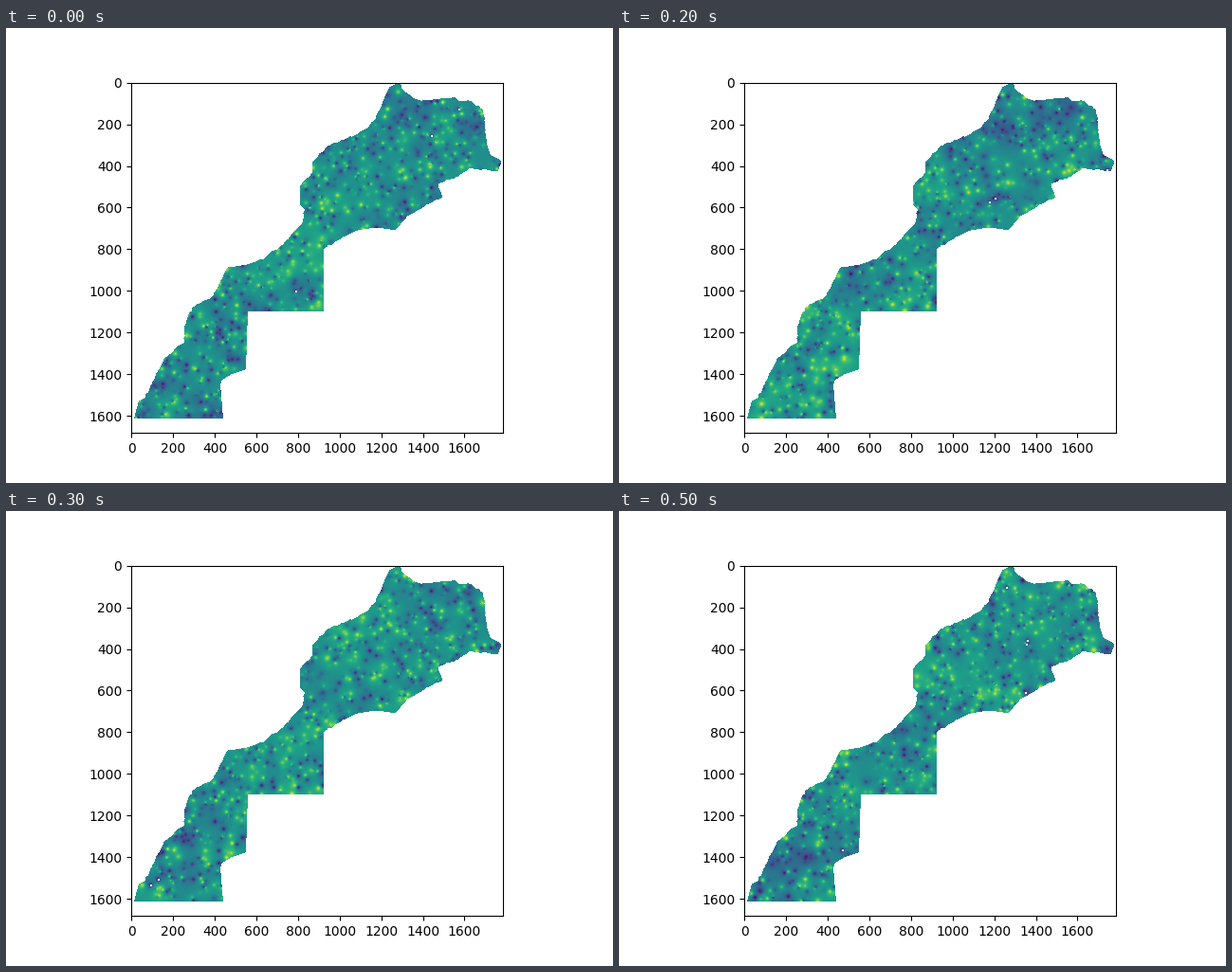
Write a matplotlib script that moves like this. It is 640 px wide and 480 px high and loops after 600 ms.

```python
import numpy as np
import matplotlib.pyplot as plt
from matplotlib.animation import FuncAnimation
from matplotlib.path import Path

WIDTH, HEIGHT = 1785, 1683          # data units of the map
COLS, ROWS = 392, 370               # one cell per screen pixel
LEFT, TOP = 132, 57                 # screen position of the first cell
FRAMES, SAMPLES = 6, 800

# Key points of the outline in screen pixels, clockwise.
NORTH_EAST = [
    (404, 62), (416, 58), (418, 65), (430, 74), (438, 77), (474, 73),
    (477, 77), (490, 77), (503, 86), (507, 122), (511, 134), (522, 140),
    (519, 151), (488, 148), (477, 157), (456, 164), (460, 178),
    (440, 189), (422, 200), (411, 213), (390, 211), (372, 213),
    (356, 220), (335.3, 233),
]
STRAIGHT = [(335.3, 299.3), (255, 299.3), (253, 360)]
SOUTH = [(238, 365), (228, 371), (226, 376), (229, 412), (135, 412)]
WEST = [
    (140, 393), (147, 390), (166, 350), (188, 331), (188, 315),
    (196, 295), (218, 283), (233, 253), (252, 250), (270, 244),
    (293, 227), (312, 206), (315, 192), (310, 186), (310, 167),
    (323, 152), (324, 140), (340, 124), (368, 113), (382, 105),
    (390, 95), (404, 62),
]


def roughen(points, rng, step=3, amount=0.5):
    """Split a line into short steps and jitter the inner ones."""
    line = []
    for start, end in zip(np.array(points[:-1]), np.array(points[1:])):
        count = max(1, int(np.hypot(*(end - start)) / step))
        line.append(start)
        line += [start + (end - start) * k / count + rng.normal(0, amount, 2)
                 for k in range(1, count)]
    return line + [points[-1]]


def squared_distance(a, b):
    return ((a[:, None, 0] - b[None, :, 0]) ** 2
            + (a[:, None, 1] - b[None, :, 1]) ** 2)


def interpolate(points, values):
    """Inverse distance weighting over the land cells."""
    result = []
    for block in np.array_split(land, 12):
        weight = 1 / (squared_distance(block, points) + 0.3)
        result.append(weight @ values / weight.sum(axis=1))
    return np.concatenate(result)


def make_field(index):
    rng = np.random.default_rng(40 + index)
    points = land[rng.choice(len(land), SAMPLES, replace=False)]
    values = rng.random(SAMPLES, dtype=np.float32)
    holes = points[:rng.integers(2, 6)] + np.float32(0.5)
    values[:len(holes)] = 0

    surface = interpolate(points, values)
    surface[squared_distance(land, holes).min(axis=1) < 1] = np.nan
    field = np.full(ROWS * COLS, np.nan)
    field[inside] = surface
    return field.reshape(ROWS, COLS)


edge_rng = np.random.default_rng(7)
outline = (roughen(NORTH_EAST, edge_rng) + STRAIGHT + SOUTH
           + roughen(WEST, edge_rng))
grid_x, grid_y = np.meshgrid(LEFT + np.arange(COLS) + 0.5,
                             TOP + np.arange(ROWS) + 0.5)
cells = np.column_stack([grid_x.ravel(), grid_y.ravel()])
inside = Path(outline).contains_points(cells)
land = cells[inside].astype(np.float32)
fields = [make_field(i) for i in range(FRAMES)]

fig, ax = plt.subplots(figsize=(6.4, 4.8), dpi=100)
image = ax.imshow(fields[0], vmin=0, vmax=1, cmap="viridis",
                  interpolation="nearest",
                  extent=(-0.5, WIDTH - 0.5, HEIGHT - 0.5, -0.5))


def update(index):
    image.set_data(fields[index])
    return [image]


animation = FuncAnimation(fig, update, frames=FRAMES, interval=100,
                          repeat=True, repeat_delay=0)
plt.show()
```
